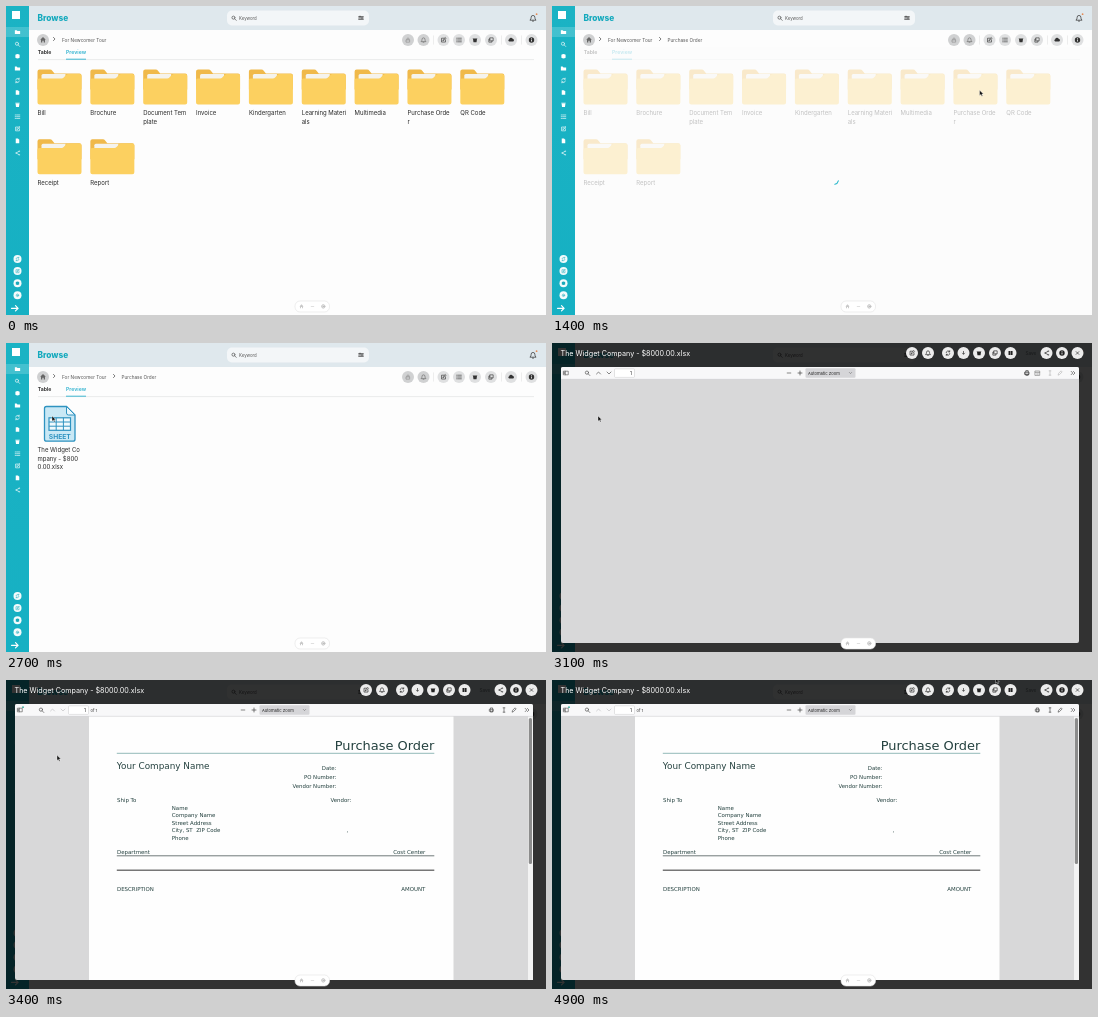
Recreate the animation shown at these times as an HTML page. Size 540 by 309 pixels, loop 5 s.

```html
<!DOCTYPE html>
<html lang="en">
<head>
<meta charset="utf-8">
<title>Document browser</title>
<style>
html, body { margin: 0; width: 100%; height: 100%; overflow: hidden; background: #fdfdfd; }
svg { display: block; width: 100%; height: 100%; }
text { font-family: Inter, "Open Sans", sans-serif; }
.doc text { font-family: "DejaVu Sans", sans-serif; fill: #24413f; }
</style>
</head>
<body>
<svg id="stage" viewBox="0 0 540 309"></svg>
<script>
const LOOP = 5000, STEP = 100;

// icons drawn in a box of -3..3
const ICONS = {
  folder: { d: 'M-3-2h2l1 1h3v3.4h-6z', solid: 1 },
  search: { d: 'M1.2-.4a1.8 1.8 0 1 1-3.6 0a1.8 1.8 0 1 1 3.6 0M.8 1l1.8 1.8' },
  stack: { d: 'M-2.4-1.6q2.4-1.6 4.8 0v3.4q-2.4 1.4-4.8 0z', solid: 1 },
  sync: { d: 'M-2-.4a2.1 2.1 0 0 1 3.8-1M2 .6a2.1 2.1 0 0 1-3.8 1M1.9-2.6v1.3h-1.3M-1.9 2.8v-1.3h1.3' },
  page: { d: 'M-2-2.6h2.6l1.4 1.4v3.8h-4z', solid: 1 },
  bin: { d: 'M-2.2-1.2h4.4l-.5 3.8h-3.4zM-2.5-2.2h5v.6h-5z', solid: 1 },
  list: { d: 'M-1-2h3.6M-1 0h3.6M-1 2h3.6M-2.6-2h.6M-2.6 0h.6M-2.6 2h.6' },
  edit: { d: 'M.6-2h-2.8v4.3h4.4v-2.4M-.6.7l.2-1.1 2.4-2.4.8.8-2.4 2.4z' },
  share: { d: 'M2-2l-3.6 2 3.6 2M1.5-2h1M-2.1 0h1M1.5 2h1' },
  home: { d: 'M-2.8 0l2.8-2.7 2.8 2.7h-.8v2.6h-1.3v-1.7h-1.4v1.7h-1.3v-2.6z', solid: 1 },
  lock: { d: 'M-1.8-.2h3.6v2.6h-3.6zM-1.1-.2v-1a1.1 1.1 0 0 1 2.2 0v1' },
  bell: { d: 'M-2.4 1.5q.8-.8.8-2.3a1.6 1.6 0 0 1 3.2 0q0 1.5.8 2.3zM-.5 2.5h1' },
  copy: { d: 'M-1-2.4h3.4v3.4h-3.4zM-1-1h-1.4v3.4h3.4v-1.4' },
  card: { d: 'M-2.2-2h4.4v4.4h-4.4zM-2.2-.6h4.4M-.8 1h1.6' },
  cloud: { d: 'M-2 1.6a1.3 1.3 0 0 1 0-2.5a2.1 2.1 0 0 1 4-.1a1.3 1.3 0 0 1 0 2.6z', solid: 1 },
  info: { d: 'M0-3a3 3 0 1 1 0 6a3 3 0 1 1 0-6M-.5-.5v2.2h1v-2.2zM-.5-1.9v.9h1v-.9z', solid: 1 },
  sliders: { d: 'M-2.3-1.4h4.6M-2.3 0h4.6M-2.3 1.4h4.6M-1-1.9v1M1-.5v1' },
  down: { d: 'M0-1.8v3M-1.2.2l1.2 1.2 1.2-1.2' },
  close: { d: 'M-1.5-1.5l3 3M1.5-1.5l-3 3' },
  book: { d: 'M-2.2-2.2h2.2v4.4h-2.2zM.5-2.2h1.8v4.4h-1.8', solid: 1 },
  gear: { d: 'M1.8 0a1.8 1.8 0 1 1-3.6 0a1.8 1.8 0 1 1 3.6 0M.6 0a.6.6 0 1 1-1.2 0a.6.6 0 1 1 1.2 0' },
  print: { d: 'M-2-.8h4v2.2h-4zM-1.2-.8v-1.5h2.4v1.5M-1.2.6v1.7h2.4v-1.7' },
  side: { d: 'M-2.5-2h5v4h-5zM-.8-2v4M-2.3-.7h1M-2.3.5h1' },
  caret: { d: 'M-1-2.4h2M0-2.4v4.8M-1 2.4h2' },
  pen: { d: 'M-2 2l.5-1.7 2.7-2.7 1.2 1.2-2.7 2.7z' },
  up: { d: 'M-2 1l2-2 2 2' },
  drop: { d: 'M-2-1l2 2 2-2' },
  next: { d: 'M-1.2-1.8l1.8 1.8-1.8 1.8' },
  more: { d: 'M-2-1.8l1.8 1.8-1.8 1.8M.4-1.8l1.8 1.8-1.8 1.8' },
  minus: { d: 'M-1.8 0h3.6' },
  plus: { d: 'M-2 0h4M0-2v4' },
  arrow: { d: 'M-3.5 0h6.5M.5-2.6l2.6 2.6-2.6 2.6' }
};

const rect = (x, y, w, h, fill, r = 0, extra = '') =>
  `<rect x="${x}" y="${y}" width="${w}" height="${h}" rx="${r}" fill="${fill}" ${extra}/>`;
const dot = (x, y, r, fill, extra = '') =>
  `<circle cx="${x}" cy="${y}" r="${r}" fill="${fill}" ${extra}/>`;
const path = (d, fill, extra = '') => `<path d="${d}" fill="${fill}" ${extra}/>`;
const line = (x1, x2, y, color, w) => path(`M${x1} ${y}H${x2}`, 'none', `stroke="${color}" stroke-width="${w}"`);
const text = (s, x, y, size, fill = '#333', weight = 400, anchor = 'start') =>
  `<text x="${x}" y="${y}" font-size="${size}" fill="${fill}" font-weight="${weight}" text-anchor="${anchor}">${s}</text>`;
const group = (body, attrs = '') => `<g ${attrs}>${body}</g>`;

function icon(name, x, y, color = '#333', k = 1, w = .7) {
  const { d, solid } = ICONS[name];
  const paint = solid
    ? `fill="${color}" fill-rule="evenodd"`
    : `fill="none" stroke="${color}" stroke-width="${w}" stroke-linejoin="round" stroke-linecap="round"`;
  return `<path d="${d}" transform="translate(${x} ${y}) scale(${k})" ${paint}/>`;
}
const badge = (name, x, y, fill, color, k = .9) => dot(x, y, 6, fill) + icon(name, x, y, color, k);

function sidebar() {
  const names = ['folder', 'search', 'stack', 'folder', 'sync', 'page', 'bin', 'list', 'edit', 'page', 'share'];
  const low = ['sync', 'edit', 'stack', 'gear'];
  return rect(0, 0, 23, 309, 'url(#teal)') +
    rect(6, 5, 8, 8, '#fff') +
    rect(0, 21, 23, 10, '#fff', 0, 'opacity=".18"') +
    names.map((n, i) => icon(n, 11.5, 26 + i * 12.1, '#fff', .88)).join('') +
    low.map((n, i) => dot(11.5, 253 + i * 12.1, 4, '#f4fbfc') + icon(n, 11.5, 253 + i * 12.1, '#1aa9ba', .7)).join('') +
    icon('arrow', 9, 302.3, '#fff', 1, 1.2);
}

function header() {
  const tools = [
    ['lock', 402, '#d0d1d2', '#8d8d8d'], ['bell', 417.5, '#d0d1d2', '#666'],
    ['edit', 437.5], ['list', 453], ['bin', 469], ['copy', 485], ['cloud', 505], ['info', 525.5]
  ];
  return rect(23, 0, 517, 24, '#dfe8ed') +
    text('Browse', 31.5, 15.2, 8.3, '#13a9bd', 800) +
    rect(221, 4.5, 142, 15, '#f3f6f8', 5) +
    icon('search', 228, 12, '#333', .85) +
    text('Keyword', 233, 13.7, 4.3, '#555') +
    icon('sliders', 355, 12, '#333') +
    icon('bell', 527, 12.2, '#444', 1.15) +
    dot(530.6, 8.2, .9, '#e58b55') +
    dot(37, 34, 6, '#cfd0d1') + icon('home', 37, 33.8, '#666') +
    icon('next', 48.5, 33, '#333', .9) +
    text('For Newcomer Tour', 56, 35.6, 4.75, '#555') +
    tools.map(([n, x, bg = '#dfe0e1', c = '#333']) => badge(n, x, 34, bg, c)).join('') +
    [427.5, 495, 515.2].map(x => rect(x, 29.5, .5, 9, '#dcdcdc')).join('');
}

const tabs = () =>
  text('Table', 31.7, 48.4, 5.2, '#222', 600) +
  text('Preview', 60, 48.4, 5.2, '#2cb1cf', 600) +
  line(32, 528, 53.6, '#dedfe0', .6) +
  line(60, 80, 53.2, '#2cb1cf', .9);

const folder = () =>
  path('M0 6V2q0-2 2-2H12.5q1.5 0 2.3 1.2L17 4H42q2 0 2 2V20H0z', '#f0b94a') +
  path('M4 6q0-1.5 1.5-1.5H28V11H4z', '#f5f3ec') +
  path('M0 10.5q0-1.7 1.7-1.7H24q1.3 0 2.2-1L28.6 5.3q.9-.9 2.2-.9H42q2 0 2 2V33q0 2-2 2H2q-2 0-2-2z', '#fcd060');

const label = (lines, x, y) =>
  lines.map((s, i) => text(s, x, y + i * 8.6, 6, '#2b2b2b')).join('');

function folders() {
  const names = ['Bill', 'Brochure', 'Document Tem|plate', 'Invoice', 'Kindergarten', 'Learning Materi|als',
    'Multimedia', 'Purchase Orde|r', 'QR Code', 'Receipt', 'Report'];
  return names.map((n, i) => {
    const x = 31.5 + (i % 9) * 52.85, y = i < 9 ? 63.6 : 133.2;
    return group(folder(), `transform="translate(${x} ${y})"`) + label(n.split('|'), x, y + 45.5);
  }).join('');
}

function sheetFile() {
  const blue = '#2f93c0';
  return path('M40.5 63.5H60.5L69 72V96.2q0 2-2 2H40.5q-2 0-2-2V65.5q0-2 2-2z', '#c9e8f5', `stroke="${blue}" stroke-width="1.3"`) +
    path('M60.5 63.5V70q0 2 2 2H69z', '#eaf7fc', `stroke="${blue}" stroke-width="1"`) +
    rect(43, 74.8, 21.5, 12.5, '#f0fafd', 0, `stroke="${blue}" stroke-width="1.2"`) +
    path('M43 79H64.5M43 83.2H64.5M50.2 74.8V87.3M57.4 74.8V87.3', 'none', `stroke="${blue}" stroke-width="1"`) +
    text('SHEET', 53.8, 95.6, 6.7, blue, 700, 'middle') +
    label(['The Widget Co', 'mpany - $800', '0.00.xlsx'], 31.5, 109.1);
}

const pill = () =>
  rect(289, 295, 34.5, 11, '#fff', 5, 'stroke="#e2e2e2" stroke-width=".6"') +
  icon('home', 295.5, 300.4, '#c9c9c9', .75) + icon('minus', 306.5, 300.5, '#c0c0c0', .7) + icon('gear', 317.3, 300.4, '#a9a9a9', .95);

function viewer() {
  const tools = [['edit', 360], ['bell', 376], ['sync', 396], ['down', 411.5], ['bin', 427], ['copy', 443],
    ['book', 458.5], ['share', 494.5], ['info', 510], ['close', 525.5]];
  return rect(0, 0, 540, 309, '#000', 0, 'opacity=".8"') +
    text('The Widget Company - $8000.00.xlsx', 8.5, 12.5, 7.18, '#fff') +
    text('Save', 473.5, 11.8, 4.6, '#17191a') +
    tools.map(([n, x]) => badge(n, x, 10, '#ececec', '#222')).join('') +
    rect(9, 24, 518, 276, '#d8d8d9', 2) +
    path('M9 36.3V26q0-2 2-2H525q2 0 2 2V36.3z', '#f8f8f9') +
    line(9, 527, 36.3, '#c4c4c6', .5) +
    icon('side', 14, 30, '#555', .9) + icon('search', 35.5, 30, '#444', .9) +
    rect(62.5, 25.8, 20, 8.6, '#fff', 1, 'stroke="#c8c8ca" stroke-width=".5"') +
    text('1', 79.8, 31.8, 4.6, '#222', 400, 'end') +
    icon('minus', 237, 30, '#555') + icon('plus', 248, 30, '#444') +
    rect(253.5, 25.3, 50, 9.5, '#d5d5d8', 1) +
    text('Automatic Zoom', 256, 31.6, 4.1, '#222') +
    icon('drop', 298.5, 30, '#444', .6) +
    icon('more', 521, 30, '#444', .9);
}

const waiting = () =>
  icon('up', 46.5, 30, '#555') + icon('drop', 57, 30, '#555') +
  icon('print', 475, 30, '#333') + icon('card', 485.5, 30, '#888') +
  icon('caret', 498, 30, '#b5b5b5', .9) + icon('pen', 508, 30, '#b5b5b5', .9);

function order() {
  const t = (s, x, y, size = 5.45, anchor) => text(s, x, y, size, '#24413f', 400, anchor);
  const address = ['Name', 'Company Name', 'Street Address', 'City, ST&#160; ZIP Code', 'Phone'];
  const fields = ['Date:', 'PO Number:', 'Vendor Number:'];
  return icon('up', 46.5, 30, '#c2c2c4') + icon('drop', 57, 30, '#c2c2c4') + dot(17, 27.2, .9, '#3a9') +
    text('of 1', 84.5, 31.6, 4.1, '#333') +
    icon('print', 485.5, 30, '#444', .9) + icon('caret', 498, 30, '#444', .9) + icon('pen', 508, 30, '#444', .9) +
    rect(83, 36.6, 364.5, 263.4, '#fefefe') +
    rect(522, 36.6, 5, 263.4, '#f3f3f3') + rect(522.8, 38, 3.2, 146, '#8c8c8c', 1.5) +
    group(
      t('Purchase Order', 428.3, 70.2, 12.95, 'end') +
      t('Your Company Name', 110.8, 89.2, 8.85) +
      fields.map((s, i) => t(s, 330.5, 90.3 + i * 8.75, 5.4, 'end')).join('') +
      t('Ship To', 111, 122.4) + t('Vendor:', 345.3, 122.4, 5.45, 'end') +
      address.map((s, i) => t(s, 165.8, 130 + i * 7.45)).join('') +
      t(',', 340.5, 152.4) +
      t('Department', 111, 174.2) + t('Cost Center', 419.3, 174.2, 5.45, 'end') +
      t('DESCRIPTION', 111, 211.2) + t('AMOUNT', 419.3, 211.2, 5.45, 'end'), 'class="doc"') +
    line(110.8, 428.3, 73.3, '#79a9a8', .8) +
    line(110.8, 428.3, 175.8, '#4c5a5a', .8) +
    line(110.8, 428.3, 190.3, '#777', 1.4);
}

const stage = document.getElementById('stage');
stage.innerHTML =
  `<defs><linearGradient id="teal" x1="0" y1="0" x2="0" y2="1">
    <stop offset="0" stop-color="#1bb3c4"/><stop offset="1" stop-color="#16b0c3"/></linearGradient></defs>` +
  rect(0, 0, 540, 309, '#fdfdfd') + header() + tabs() +
  group(icon('next', 108.5, 33, '#333', .9) + text('Purchase Order', 115.5, 35.6, 4.7, '#555'), 'id="crumb"') +
  group(folders(), 'id="folders"') +
  group(sheetFile(), 'id="file"') +
  group(rect(23, 40.5, 517, 268.5, '#fdfdfd', 0, 'opacity=".72"') +
    path('M5 0A5 5 0 0 1 2.6 4.3', 'none', 'id="spin" stroke="#2cb9cc" stroke-width="1.1" stroke-linecap="round"'), 'id="veil"') +
  sidebar() +
  group(viewer(), 'id="viewer"') +
  group(waiting(), 'id="waiting"') +
  group(order(), 'id="order"') +
  pill() +
  path('M0 0V5.2L1.3 4.1L2.2 6L3.1 5.6L2.2 3.8H3.8z', '#111', 'id="cursor" stroke="#fff" stroke-width=".35"');

const el = id => document.getElementById(id);
const show = (id, on) => { el(id).style.display = on ? '' : 'none'; };
const ease = p => p * p * (3 - 2 * p);

// time, x, y
const TRAIL = [
  [0, 443, -9], [100, 443, -9], [700, 427.6, 84.3], [1800, 427.6, 84.3], [2500, 46, 73],
  [3200, 46, 73], [3400, 51, 75.3], [3900, 51, 75.3], [4800, 443.5, -2], [5000, 443.5, -2]
];

function place(t) {
  const i = TRAIL.findIndex(k => k[0] > t);
  const [t0, x0, y0] = TRAIL[i - 1], [t1, x1, y1] = TRAIL[i];
  const p = ease((t - t0) / (t1 - t0));
  return [x0 + (x1 - x0) * p, y0 + (y1 - y0) * p];
}

function draw(t) {
  show('crumb', t >= 1300);
  show('folders', t < 1800);
  show('file', t >= 1800);
  show('veil', t >= 1300 && t < 1800);
  show('viewer', t >= 2900);
  el('viewer').style.opacity = t < 3000 ? .5 : 1;
  show('waiting', t >= 3000 && t < 3300);
  show('order', t >= 3300);
  el('spin').setAttribute('transform', `translate(281.5 173.5) rotate(${(t - 1400) * .45 + 15})`);
  el('cursor').setAttribute('transform', `translate(${place(t)})`);
}

function tick(now) {
  draw(Math.floor((now % LOOP) / STEP) * STEP);
  requestAnimationFrame(tick);
}
draw(0);
requestAnimationFrame(tick);
</script>
</body>
</html>
```
